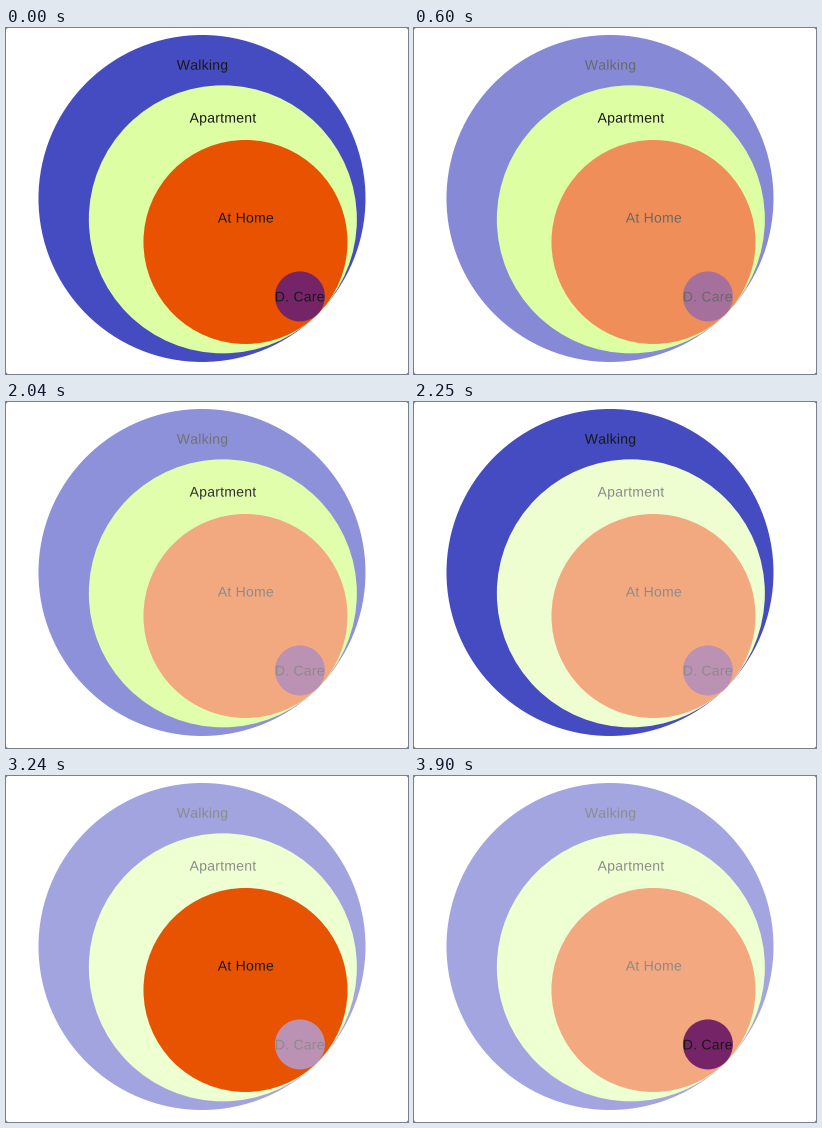
These frames come from a looping animation (402x346 px, 4650 ms). A matplotlib script:

```python
import math

import matplotlib.pyplot as plt
import numpy as np
from matplotlib.animation import FuncAnimation
from matplotlib.colors import to_rgb
from matplotlib.patches import Circle, FancyBboxPatch, PathPatch
from matplotlib.path import Path
from matplotlib.textpath import TextPath
from matplotlib.transforms import Affine2D

W, H, DPI = 402, 346, 64
STEP, LOOP = 30, 4650

# All rings touch at one point, on the diagonal from their centres.
TOUCH = np.array([311.6, 286.1])
RINGS = [
    ("Walking", 163.5, "#454bc0"),
    ("Apartment", 134, "#ddfea2"),
    ("At Home", 102, "#e85200"),
    ("D. Care", 25, "#762468"),
]

FONT_PX, TRACKING, CAP = 14, 0.25, 10
INK = "#181818"

# start ms, ms already elapsed at the first step, highlighted ring
SWITCHES = [(540, 51, 1), (2040, 45, 0), (3030, 32, 2), (3690, 40, 3)]
FADE_MS, DIM = 270, 0.5


def bezier(u, a, b):
    return 3 * a * u * (1 - u) ** 2 + 3 * b * u**2 * (1 - u) + u**3


def ease(t):
    """Cubic ease with control points (.25, .1) and (.25, 1)."""
    u = np.linspace(0, 1, 200)
    return np.interp(t, bezier(u, 0.25, 0.25), bezier(u, 0.1, 1))


def over_white(color, opacity):
    return 1 - opacity * (1 - np.array(to_rgb(color)))


def opacities(ms):
    level = np.ones(len(RINGS))
    for start, lead, lit in SWITCHES:
        if ms >= start:
            goal = np.where(np.arange(len(RINGS)) == lit, 1, DIM)
            level += (goal - level) * ease((ms - start + lead) / FADE_MS)
    return level


def outline(text):
    return TextPath((0, 0), text, size=FONT_PX, prop={"family": "Liberation Sans"})


def right_edge(text):
    return outline(text).get_extents().x1


def tracked(text, cx, baseline):
    """Outline of letter-spaced text, centred on cx."""
    glyphs, x = [], 0
    for char in text:
        if char != " ":
            glyphs.append(Affine2D().translate(x, 0).transform_path(outline(char)))
        x += right_edge(f"H{char}H") - right_edge("HH") + TRACKING
    path = Path.make_compound_path(*glyphs)
    box = path.get_extents()
    place = Affine2D().translate(-(box.x0 + box.x1) / 2, 0).scale(1, -1)
    return place.translate(cx, baseline).transform_path(path)


def centre(radius):
    return TOUCH - radius / math.sqrt(2)


def top(radius):
    return centre(radius)[1] - radius


fig = plt.figure(figsize=(W / DPI, H / DPI), dpi=DPI, facecolor="#808080")
ax = fig.add_axes([0, 0, 1, 1])
ax.set_xlim(0, W)
ax.set_ylim(H, 0)
ax.axis("off")
ax.add_patch(FancyBboxPatch((0, 0), W, H, fc="white", ec="none",
                            boxstyle="round,pad=0,rounding_size=2.5"))

discs, labels = [], []
for i, (name, radius, _) in enumerate(RINGS):
    cx, cy = centre(radius)
    if i + 1 < len(RINGS):
        # label sits in the gap above the next ring
        cy = top(radius) + 0.59 * (top(RINGS[i + 1][1]) - top(radius))
    label = PathPatch(tracked(name, cx, cy + CAP / 2), lw=0, zorder=10)
    discs.append(ax.add_patch(Circle(centre(radius), radius, lw=0, zorder=2 + i)))
    labels.append(ax.add_patch(label))


def draw(frame):
    for disc, label, ring, level in zip(discs, labels, RINGS, opacities(frame * STEP)):
        disc.set_facecolor(over_white(ring[2], level))
        label.set_facecolor(over_white(INK, level))
    return discs + labels


anim = FuncAnimation(fig, draw, frames=LOOP // STEP, interval=STEP,
                     init_func=lambda: draw(0), repeat=True, repeat_delay=0)
plt.show()
```
